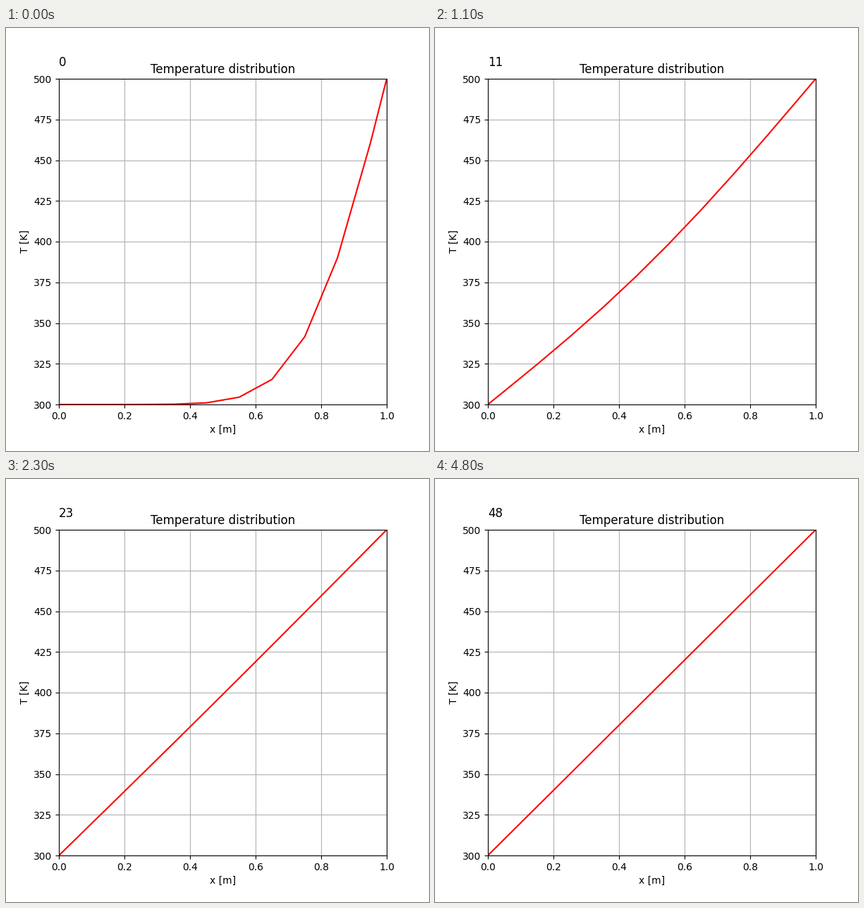
A matplotlib script for the animation above (4.9 s loop, 600x600 px).

```python
import numpy as np
import matplotlib.pyplot as plt
from matplotlib.animation import FuncAnimation

CELLS = 10
FRAMES = 49
SUBSTEPS = 10      # explicit time steps per frame
FOURIER = 0.2      # alpha * dt / dx**2
T_LEFT, T_RIGHT = 300.0, 500.0


def advance(T):
    """One explicit finite-volume step; wall faces lie half a cell away."""
    flux = np.diff(np.concatenate(([T_LEFT], T, [T_RIGHT])))
    flux[[0, -1]] *= 2
    return T + FOURIER * np.diff(flux)


def solve():
    T = np.full(CELLS, T_LEFT)
    profiles = []
    for _ in range(FRAMES):
        for _ in range(SUBSTEPS):
            T = advance(T)
        profiles.append(np.concatenate(([T_LEFT], T, [T_RIGHT])))
    return profiles


dx = 1 / CELLS
x = np.concatenate(([0], (np.arange(CELLS) + 0.5) * dx, [1]))
profiles = solve()

fig, ax = plt.subplots(figsize=(6, 6), dpi=100)
ax.set(xlim=(0, 1), ylim=(T_LEFT, T_RIGHT), xlabel="x [m]", ylabel="T [K]",
       title="Temperature distribution")
ax.grid(True)
line, = ax.plot(x, profiles[0], color="red")
counter = ax.text(0, 1.04, "0", fontsize=12, transform=ax.transAxes)


def update(i):
    line.set_ydata(profiles[i])
    counter.set_text(str(i))
    return line, counter


anim = FuncAnimation(fig, update, frames=FRAMES, interval=100,
                     repeat=True, repeat_delay=0)
plt.show()
```
